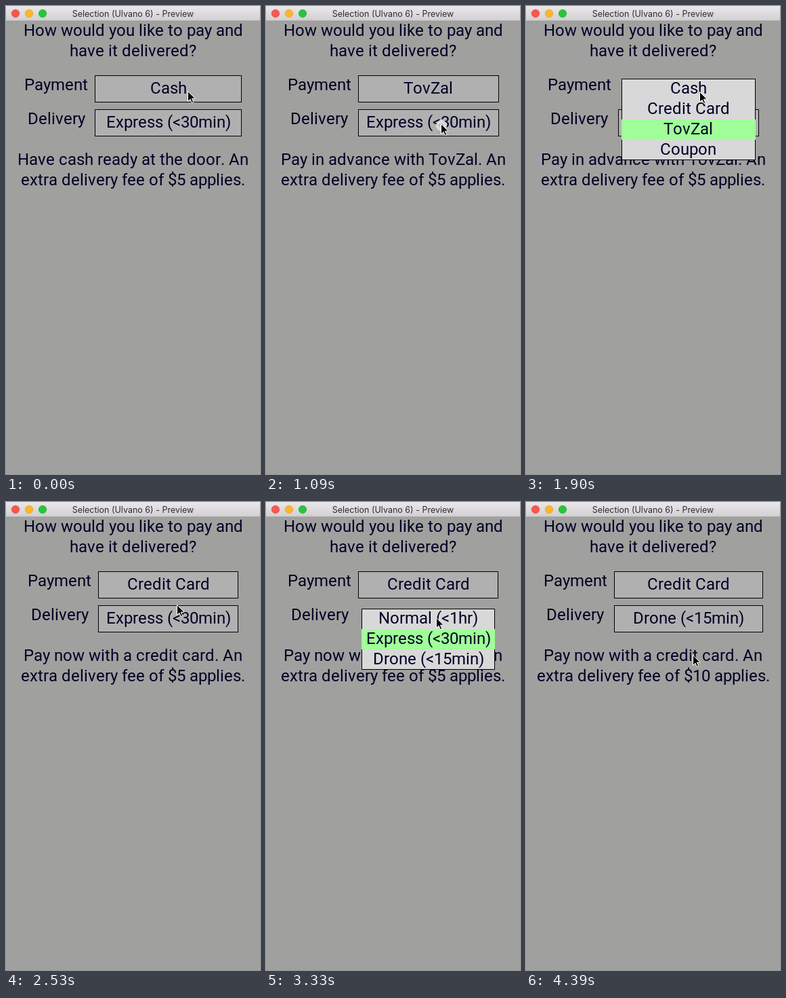
Write an HTML page that moves like this. It is 375 px wide and 689 px high and loops after 4.43 s.

```html
<!DOCTYPE html>
<html lang="en">
<head>
<meta charset="utf-8">
<title>Payment and delivery</title>
<style>
  html, body { margin: 0; width: 100%; height: 100%; overflow: hidden; background: #a0a09e; }
  svg { display: block; width: 375px; height: 689px; }
  text { font: 24px Roboto, sans-serif; fill: #000026; }
  .title { font: 12.5px Inter, sans-serif; fill: #2e2c2e; text-anchor: middle; }
</style>
</head>
<body>
<svg viewBox="0 0 375 689">
  <defs>
    <linearGradient id="bar" x2="0" y2="1">
      <stop stop-color="#eae8ea"/>
      <stop offset="1" stop-color="#d2d0d2"/>
    </linearGradient>
  </defs>
  <rect width="375" height="689" fill="#a0a09e"/>
  <rect width="375" height="21" fill="url(#bar)"/>
  <rect y="21" width="375" height="1" fill="#b3b1b2"/>
  <g stroke-width=".6">
    <circle cx="14" cy="11" r="5.8" fill="#fc5650" stroke="#df3d38"/>
    <circle cx="34" cy="11" r="5.8" fill="#fdb52c" stroke="#de9b1c"/>
    <circle cx="54" cy="11" r="5.8" fill="#28c53c" stroke="#1fa82f"/>
  </g>
  <text class="title" x="187.5" y="16">Selection (Ulvano 6) - Preview</text>
  <g id="form"></g>
  <g id="ripple">
    <circle r="10" fill="#d6d6d6" stroke="#f0f0f0"/>
    <circle r="6.5" fill="#c8c8c8" stroke="#f4f4f4" stroke-width="1.5"/>
  </g>
  <path id="cursor" d="M.5 .5V15.5L4 12.2L6.4 17.6L8.8 16.6L6.4 11.2H11.2Z" stroke="#fff"/>
</svg>
<script>
const LOOP = 4430, PRESS = 60, RIPPLE = 160;
const CENTRE = 187.5, LABEL = 114, MARGIN = 10, INSET = 5, ROW = 30;

const fields = [
  { label: "Payment", y: 102, items: ["Cash", "Credit Card", "TovZal", "Coupon"] },
  { label: "Delivery", y: 152, items: ["Normal (<1hr)", "Express (<30min)", "Drone (<15min)"] }
];
const notes = ["Have cash ready at the door.", "Pay now with a credit card.", "Pay in advance with TovZal."];

// Each step moves the pointer to (x, y), then clicks to open a field or pick an item.
const steps = [
  { from: 0, to: 1, x: 268, y: 125, click: 100, open: 0 },
  { from: 556, to: 900, x: 258, y: 173, click: 1030, pick: 2 },
  { from: 1130, to: 1600, x: 257, y: 122, click: 1700, open: 0 },
  { from: 1890, to: 2030, x: 252, y: 151, click: 2230, pick: 1 },
  { from: 2830, to: 3000, x: 251, y: 170, click: 3050, open: 1 },
  { from: 3460, to: 3730, x: 246, y: 225, click: 4130, pick: 2 }
];

const $ = id => document.getElementById(id);
const clamp = u => Math.max(0, Math.min(1, u));

// Letters advance by whole pixels, without kerning.
const pen = document.createElement("canvas").getContext("2d");
pen.font = "24px Roboto, sans-serif";
const advance = c => Math.round(pen.measureText(c).width);
const width = s => [...s].reduce((sum, c) => sum + advance(c), 0);

function text(mid, y, s) {
  let next = Math.round(mid - width(s) / 2);
  const xs = [...s].map(c => (next += advance(c)) - advance(c));
  return `<text x="${xs.join(" ")}" y="${y}">${s.replace("<", "&lt;")}</text>`;
}

const frame = (l, r, y, h, fill) =>
  `<rect x="${l + .5}" y="${y + .5}" width="${r - l - 1}" height="${h - 1}" fill="${fill}" stroke="#000"/>`;

function box(l, r, mid, { y, items }, chosen, open) {
  if (!open) return frame(l, r, y, 40, "#b0b0b0") + text(mid, y + 27, items[chosen]);
  const left = l + INSET, right = r - INSET, top = y + INSET;
  return frame(left, right, top, items.length * ROW, "#d8d8d8") +
    `<rect x="${left}" y="${top + chosen * ROW}" width="${right - left}" height="${ROW}" fill="#a0ff98"/>` +
    items.map((s, i) => text(mid, top + 22 + i * ROW, s)).join("");
}

// The longest line of the message sets the width of the whole form.
function form({ chosen, open }) {
  const message = [
    `${notes[chosen[0]]} An`,
    `extra delivery fee of $${chosen[1] * 5} applies.`
  ];
  const half = Math.max(...message.map(width)) / 2;
  const l = Math.round(CENTRE - half + LABEL), r = Math.round(CENTRE + half - MARGIN);
  const mid = CENTRE + (LABEL - MARGIN) / 2;
  const boxes = fields.map((f, i) => box(l, r, mid, f, chosen[i], open === i));
  if (open === 0) boxes.reverse();   // the open menu lies on top
  return text(CENTRE, 44, "How would you like to pay and") +
    text(CENTRE, 74, "have it delivered?") +
    fields.map(f => text(CENTRE - half + LABEL / 2, f.y + 22, f.label)).join("") +
    message.map((s, i) => text(CENTRE, 234 + i * ROW, s)).join("") +
    boxes.join("");
}

function stateAt(t) {
  const chosen = [0, 1];
  let open = null;
  for (const s of steps) {
    if (t < s.click + PRESS) break;
    if (s.pick !== undefined) chosen[open] = s.pick;
    open = s.open ?? null;
  }
  return { chosen, open };
}

function pointerAt(t) {
  let { x, y } = steps[0];
  for (const s of steps) {
    const e = Math.sin(clamp((t - s.from) / (s.to - s.from)) * Math.PI / 2);
    x += (s.x - x) * e;
    y += (s.y - y) * e;
  }
  return [x, y];
}

let shown;
function draw(t) {
  const state = stateAt(t), key = JSON.stringify(state);
  if (key !== shown) $("form").innerHTML = form(state);
  shown = key;

  const [x, y] = pointerAt(t);
  $("cursor").setAttribute("transform", `translate(${Math.round(x)} ${Math.round(y)})`);

  const click = steps.findLast(s => s.click <= t)?.click ?? -LOOP;
  const age = (t - click) / RIPPLE;
  $("ripple").setAttribute("transform", `translate(${x + 1} ${y + 3}) scale(${.5 + clamp(age * 1.4) / 2})`);
  $("ripple").setAttribute("opacity", Math.min(.9, clamp((1 - age) * 1.5)));
}

const begin = performance.now();
function tick() {
  draw((performance.now() - begin) % LOOP);
  requestAnimationFrame(tick);
}
tick();
</script>
</body>
</html>
```
